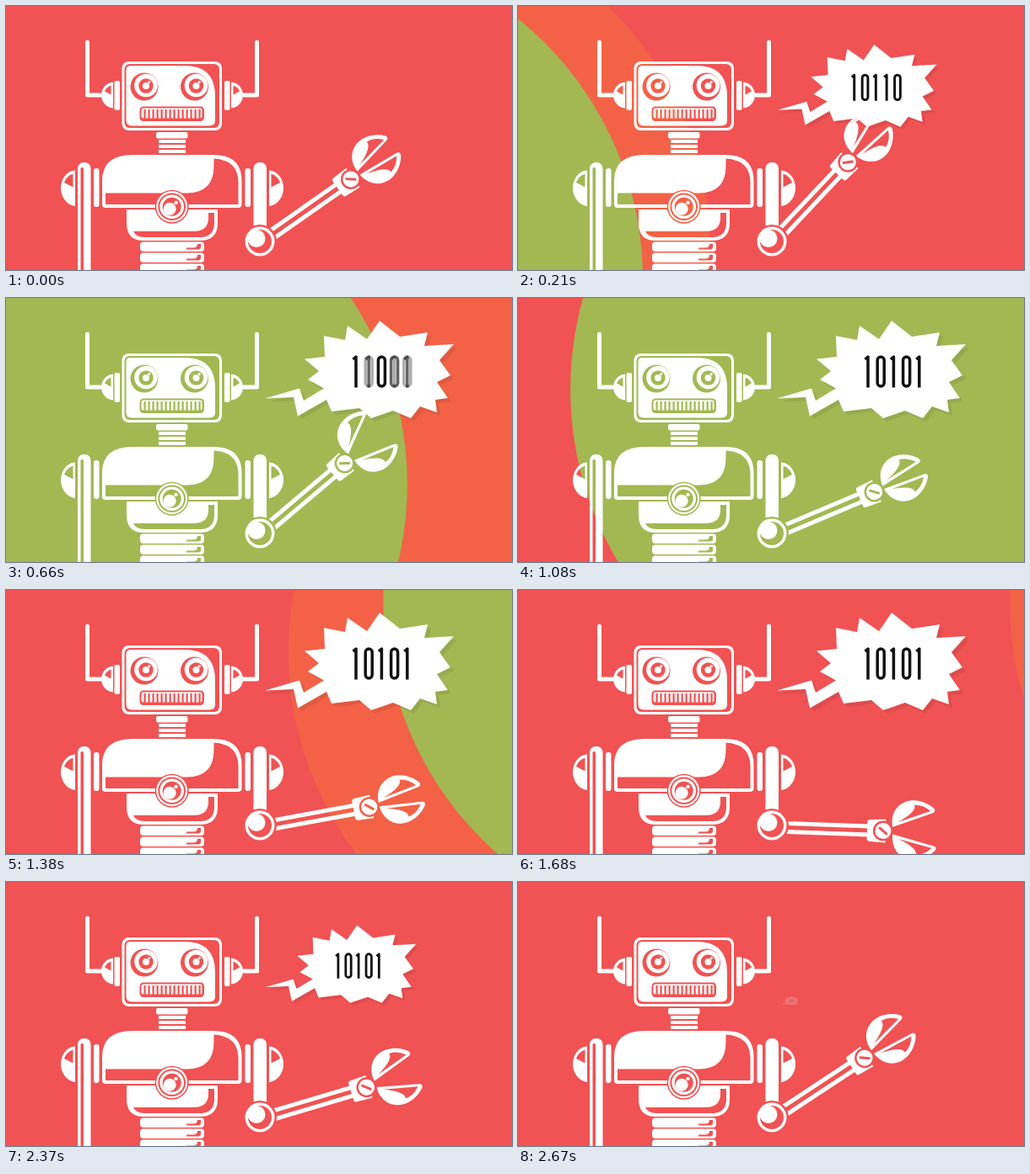
An HTML page that plays this animation: 600 by 314 pixels, repeating every 2700 ms.

```html
<!DOCTYPE html>
<html lang="en">
<head>
<meta charset="utf-8">
<title>Talking robot</title>
<style>
html, body { margin: 0; width: 100%; height: 100%; overflow: hidden; background: #f15253; }
svg { display: block; width: 100vw; height: 100vh; }
.w { fill: #fff; }
.k { fill: #000; }
.digits { fill: none; stroke: #111; stroke-width: 3.5; stroke-linejoin: round; }
</style>
</head>
<body>
<svg viewBox="0 0 600 314" role="img" aria-label="A robot waves its claw and says 10101">
<defs>
  <g id="eye">
    <circle class="w" r="18"/><circle class="k" r="16.500"/>
    <circle class="w" cx="2" cy="-1.500" r="13.800"/>
    <circle class="k" cx="2" cy="-1" r="8.700"/>
    <circle class="w" cx="2" cy="-1" r="4"/>
    <circle class="w" cx="5.800" cy="-5.500" r="1.500"/>
  </g>
  <g id="side">
    <path d="M96.500 43V106H112" fill="none" stroke="#fff" stroke-width="5" stroke-linecap="round" stroke-linejoin="round"/>
    <path class="w" d="M127 90.500V121.500C119 121 113 114 113 106S119 91 127 90.500Z"/>
    <path class="k" d="M124.500 94.500V105.500L117 101.500Q119 96.500 124.500 94.500Z"/>
    <rect class="w" x="128.500" y="89" width="6.500" height="35" rx="2"/>
    <path class="w" d="M82 195.500V238C72 237 65 227 65 216.500S72 196 82 195.500Z"/>
    <path class="k" d="M79.500 199.500V215.500L69 210Q71.500 202.500 79.500 199.500Z"/>
    <rect class="w" x="104" y="193" width="6.500" height="46" rx="3"/>
  </g>
  <g id="rib">
    <rect class="w" x="159" width="76" height="11.500" rx="4"/>
    <path class="k" d="M214 7H222Q227 7 227 2.500H231V6Q231 9 228 9H214Z"/>
  </g>
  <g id="leaf">
    <path class="w" d="M12 0L62 2.500Q67 3 66-2C60-14 48-22 37-22C25-22 15-14 12 0Z"/>
    <path class="k" d="M20-3L61-.500Q56-11 46-14.500Q46-6 20-3Z"/>
  </g>
  <path id="burst" d="M307 119.500L348 107.500L353 122L377 107.500L358 97L371 87L354 72.500L378 70L377 45L402 50L405 33L428 49L443 27L467 46L500 41L496 57L531 55L514 74L527 92L511 100L524 119L509 121L511 136L491 129L480 143L459 134L433 143L419 131L386 135L380 121L346 140.500L341 118Z"/>
  <mask id="body" maskUnits="userSpaceOnUse" x="0" y="0" width="600" height="314">
    <use href="#side"/>
    <use href="#side" transform="matrix(-1 0 0 1 394 0)"/>
    <rect class="w" x="137.500" y="66" width="118.500" height="82" rx="8"/>
    <rect class="k" x="140.500" y="69" width="112.500" height="76" rx="6"/>
    <path class="w" d="M142.500 76Q142.500 71 148 71H212C238 71 248 85 248 108V136Q248 142.500 241 142.500H149Q142.500 142.500 142.500 136Z"/>
    <use href="#eye" x="164" y="96"/>
    <use href="#eye" x="223.500" y="96"/>
    <rect class="k" x="158.500" y="119.500" width="76.500" height="17.500" rx="4.500"/>
    <rect class="w" x="160.500" y="121.500" width="72" height="12" rx="2.500"/>
    <g id="teeth" class="k"></g>
    <rect class="w" x="178" y="150" width="37.500" height="7.500" rx="2"/>
    <path d="M181 161H213M181 167H213M181 173H213" stroke="#fff" stroke-width="4"/>
    <path class="w" d="M143 242H251V258Q251 279 230 279H163Q143 279 143 258Z"/>
    <path class="k" d="M247 246V258Q247 275 230 275H164Q154 275 151 268H222Q240 268 240 252V246Z"/>
    <path class="w" d="M114 236V208Q114 177 150 177H245Q279.500 177 279.500 208V236Q279.500 240 275 240H118Q114 240 114 236Z"/>
    <path class="k" d="M118 222.500H215Q246.500 222 246.500 190V181.500Q275.500 183 275.500 210V236H118Z"/>
    <use href="#rib" y="280.500"/>
    <use href="#rib" y="293.500"/>
    <use href="#rib" y="306.500"/>
    <g transform="translate(196.700 238.700)">
      <circle class="k" r="20"/><circle class="w" r="18.500"/>
      <circle class="k" r="16.300"/><circle class="w" r="14.300"/>
      <circle class="k" r="11"/>
      <circle class="w" cx="-2.500" cy="2.500" r="7.500"/>
      <circle class="w" cx="4.800" cy="-4.800" r="2.200"/>
    </g>
    <rect class="w" x="85" y="186" width="15.500" height="140" rx="7"/>
    <rect class="k" x="88.500" y="192" width="3.500" height="130" rx="1.500"/>
    <rect class="w" x="293.500" y="186" width="15.500" height="85" rx="7"/>
    <g id="arm">
      <path class="w" d="M17-7.500H114V-2.500H17ZM17 2.500H114V7.500H17Z"/>
      <g transform="translate(132)">
        <g id="upper"><use href="#leaf"/></g>
        <g id="lower"><use href="#leaf" transform="scale(1 -1)"/></g>
        <path class="w" d="M-19-10Q-19-13-16-13L3-14V14L-16 13Q-19 13-19 10Z"/>
        <circle class="k" r="12"/><circle class="w" r="9.500"/>
        <rect class="k" x="-6.500" y="-1.500" width="13" height="3" rx="1" transform="rotate(39)"/>
      </g>
    </g>
    <circle class="k" cx="301" cy="280" r="20"/>
    <circle class="w" cx="301" cy="280" r="17.500"/>
    <circle class="k" cx="301" cy="280" r="14"/>
    <circle class="w" cx="297" cy="276.500" r="10.500"/>
  </mask>
</defs>
<rect width="600" height="314" fill="#f15253"/>
<circle id="orange" r="400" fill="#f36246"/>
<circle id="green" r="400" fill="#a3b853"/>
<rect width="600" height="314" fill="#fff" mask="url(#body)"/>
<g id="bubble">
  <use href="#burst" x="4" y="4" opacity=".08"/>
  <use href="#burst" fill="#fff"/>
  <g id="digits" class="digits"></g>
</g>
</svg>
<script>
const LOOP = 2700;
const $ = id => document.getElementById(id);
const svg = (tag, parent, attrs) => {
  const el = document.createElementNS('http://www.w3.org/2000/svg', tag);
  for (const name in attrs) el.setAttribute(name, attrs[name]);
  return parent.appendChild(el);
};
const clamp = v => Math.max(0, Math.min(1, v));
const place = (id, transform) => $(id).setAttribute('transform', transform);

// Piecewise keys [time, value]; smooth ones use Hermite tangents.
function track(keys, t, smooth = true) {
  const last = keys.length - 1;
  if (t <= keys[0][0]) return keys[0][1];
  if (t >= keys[last][0]) return keys[last][1];
  const i = keys.findIndex(k => k[0] > t) - 1;
  const [t0, a] = keys[i], [t1, b] = keys[i + 1], d = t1 - t0, u = (t - t0) / d;
  if (!smooth) return a + (b - a) * u;
  const slope = n => {
    const p = keys[Math.max(0, n - 1)], q = keys[Math.min(last, n + 1)];
    return (q[1] - p[1]) / (q[0] - p[0]) * d;
  };
  const u2 = u * u, u3 = u2 * u;
  return (2 * u3 - 3 * u2 + 1) * a + (u3 - 2 * u2 + u) * slope(i)
    + (3 * u2 - 2 * u3) * b + (u3 - u2) * slope(i + 1);
}

const armKeys = [[0, -35.1], [336, -53.8], [1887, 10.5], [LOOP, -35.1]];
const clawKeys = [[0, 11], [390, 13], [690, 25], [1080, 9], [1380, 10.5], [1900, 28], [2010, 27], [LOOP, 11]];
const orangeX = [[0, -405], [390, 20], [540, 164], [660, 268], [1080, 510], [1380, 734], [1650, 955], [1800, 1100]];
const greenX = [[0, -410], [390, -119], [660, 75], [1080, 461], [1380, 846], [1600, 1180]];
const greenY = [[0, 370], [390, 287], [660, 222], [1080, 109], [1380, 14], [1600, -60]];

const words = ['10110', '10100', '10111', '11010', '11001', '10010', '10100', '10101'];
const STEP = 90, FIRST = 3;

for (let i = 0; i < 14; i++)
  svg('rect', $('teeth'), { x: 163.5 + i * 5, y: 123, width: 2.2, height: 11 });

const slots = Array.from({ length: 5 }, (_, i) => {
  const g = svg('g', $('digits'), { transform: `translate(${415 + i * 15.2} 87.5)` });
  return [
    svg('rect', g, { x: -4, y: -17.5, width: 8, height: 35, rx: 4 }),
    svg('path', g, { d: 'M-3.500-14.500L0-17.500V19' })
  ];
});

function drawDigits(t) {
  const pos = Math.max(0, Math.min(words.length - 1, t / STEP - FIRST));
  const k = Math.floor(pos), mix = pos - k;
  const from = words[k], to = words[Math.min(k + 1, words.length - 1)];
  slots.forEach((glyphs, i) => glyphs.forEach((el, d) => {
    el.setAttribute('opacity', (from[i] == d) * (1 - mix) + (to[i] == d) * mix);
  }));
}

function drawBubble(t) {
  const grow = clamp((t - 30) / 300), shrink = clamp((t - 2100) / 600);
  const scale = (1 - (1 - grow) ** 2) * (1 - shrink * shrink);
  place('bubble', `translate(311.6 147) scale(${scale}) translate(-311.6 -147)`);
  $('bubble').setAttribute('opacity', clamp((t - 30) / 150) * clamp((LOOP - t) / 150));
}

function draw(t) {
  const ox = track(orangeX, t);
  place('orange', `translate(${ox} ${245 - 0.234 * ox})`);
  place('green', `translate(${track(greenX, t)} ${track(greenY, t)})`);

  const claw = track(clawKeys, t);
  place('arm', `translate(301 282) rotate(${track(armKeys, t, false)})`);
  place('upper', `rotate(${-3.5 - claw})`);
  place('lower', `rotate(${-3.5 + claw})`);

  drawBubble(t);
  drawDigits(t);
}

function tick() {
  draw(performance.now() % LOOP);
  requestAnimationFrame(tick);
}
tick();
</script>
</body>
</html>
```
